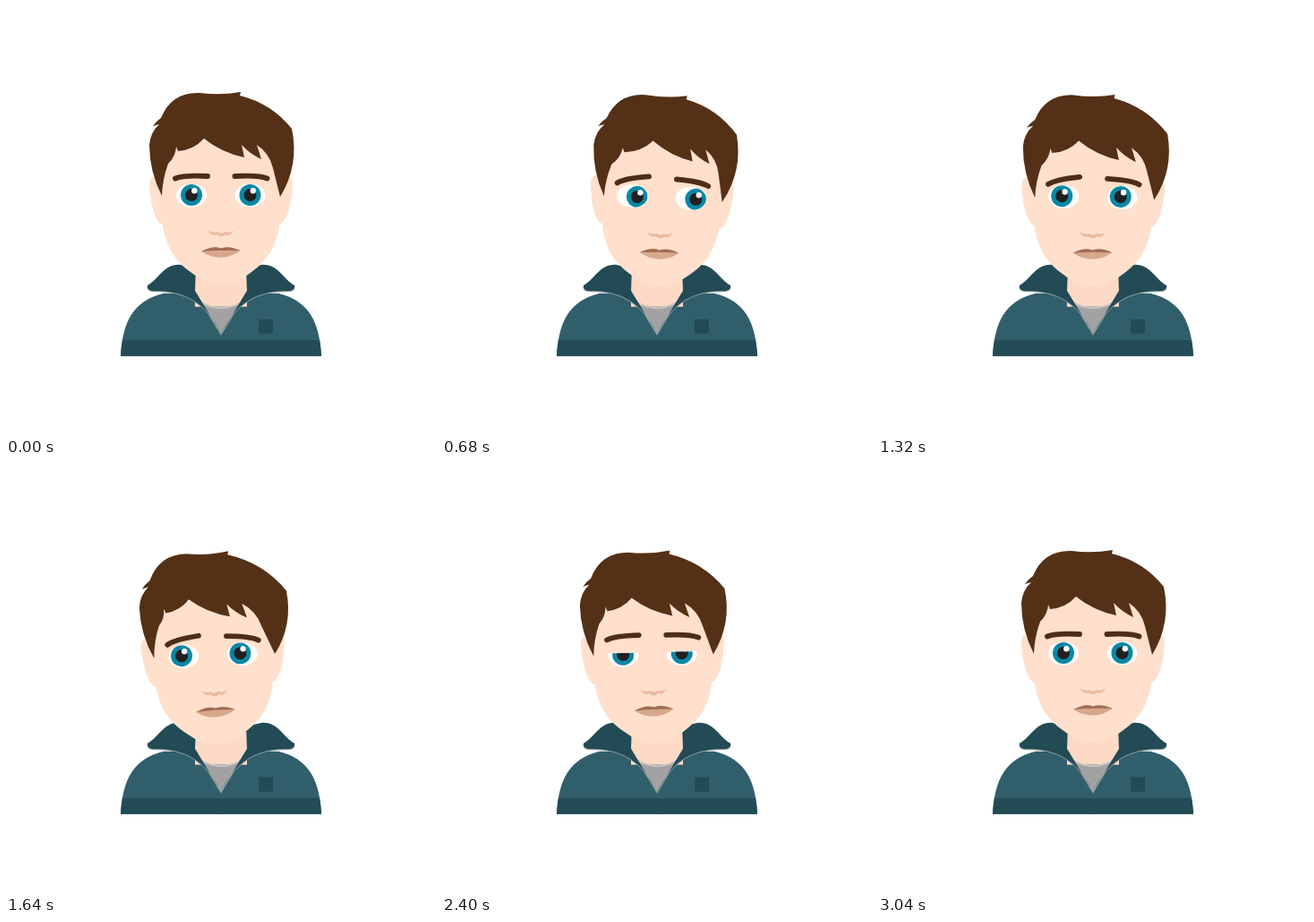
Recreate the animation shown at these times as an HTML page with a canvas. Size 480 px wide and 480 px high, loop 3080 ms.

```html
<!DOCTYPE html>
<html lang="en">
<head>
<meta charset="utf-8">
<title>Avatar looking around</title>
<style>
html, body { margin: 0; width: 100%; height: 100%; overflow: hidden; background: #fff; }
canvas { display: block; width: 100vw; height: 100vh; }
</style>
</head>
<body>
<canvas id="stage" width="480" height="480"></canvas>
<script>
const ctx = document.getElementById('stage').getContext('2d');
const LOOP = 3080, STEP = 40;
const SKIN = '#fee0cd', NECK = '#fcdac6', HAIR = '#543016', BROW = '#4d2d15';
const TEAL = '#305f6b', DARK = '#234b55', GREY = '#a3a2a2';

// left halves, mirrored at x = 240
const half = {
  body: new Path2D('M128 390C130 352 142 328 176 320H241V390Z'),
  collar: new Path2D('M212 292L194 288C176 287 171 304 158 311Q156 317 165 318Q217 316 240 365L211 317Z'),
  zip: new Path2D('M159 316Q161 318 166 318Q217 316 240 365'),
  ear: new Path2D('M172 189Q160 188 160 199Q162 232 172 243L180 245Z'),
  face: new Path2D('M170 150L174 238C177 268 188 284 206 297Q223 311 241 311V150Z')
};
const shirt = new Path2D('M217 329Q240 343 263 329L240 367Z');
const neckline = new Path2D('M217 330Q240 343 263 330');
const nose = new Path2D('M225 250.5Q230 258 235 255Q240 260 245 255Q250 258 254 250.5Q248 254 244 252Q240 255 236 252Q232 254 225 250.5Z');
const lip = new Path2D('M218 274Q240 270 262 273Q240 288 218 274Z');
const mouth = new Path2D('M218 274Q231 267 240 270.5Q249 267 262 273Q240 272 218 274Z');
const brow = new Path2D('M-18 2Q-9 -2 18 -0.5');

function ease(t, from, to) {
  const p = Math.min(1, Math.max(0, (t - from) / (to - from)));
  return (1 - Math.cos(Math.PI * p)) / 2;
}

function fill(path, color) {
  ctx.fillStyle = color;
  ctx.fill(path);
}

function stroke(path, color, width) {
  ctx.strokeStyle = color;
  ctx.lineWidth = width;
  ctx.stroke(path);
}

function dot(x, y, r, color) {
  ctx.fillStyle = color;
  ctx.beginPath();
  ctx.arc(x, y, r, 0, 7);
  ctx.fill();
}

function mirrored(draw) {
  draw();
  ctx.save();
  ctx.translate(480, 0);
  ctx.scale(-1, 1);
  draw();
  ctx.restore();
}

function drawJacket() {
  ctx.save();
  ctx.translate(0, 0.7);
  mirrored(() => {
    fill(half.body, TEAL);
    ctx.save();
    ctx.clip(half.body);
    ctx.fillStyle = DARK;
    ctx.fillRect(120, 372.3, 121, 20);
    ctx.restore();
  });
  ctx.fillStyle = NECK;
  ctx.fillRect(211, 275, 58, 60);
  fill(shirt, GREY);
  stroke(neckline, '#c9c6c5', 2);
  mirrored(() => {
    fill(half.collar, DARK);
    stroke(half.zip, '#8f9da0', 1);
  });
  ctx.fillStyle = DARK;
  ctx.fillRect(282, 349, 16, 16);
  ctx.restore();
}

function drawEye(x, y, gaze, lid) {
  ctx.save();
  ctx.beginPath();
  ctx.rect(x - 20, y - 15 + 29 * lid, 40, 40);
  ctx.clip();
  ctx.beginPath();
  ctx.ellipse(x, y + 0.5, 17, 13, 0, 0, 7);
  ctx.clip();
  ctx.fillStyle = '#fff';
  ctx.fillRect(x - 20, y - 20, 40, 40);
  ctx.translate(x + gaze, y + gaze * 0.2);
  dot(0, 0, 12, '#0b87a5');
  dot(0, 0, 7, '#211f20');
  dot(3.3, -4.8, 3.2, '#fff');
  ctx.restore();
}

function drawBrow(x, side, tilt, lift) {
  ctx.save();
  ctx.translate(x, 190.5 + lift);
  ctx.scale(side, 1);
  ctx.rotate(-tilt);
  stroke(brow, BROW, 5.8);
  ctx.restore();
}

// pen that draws arcs; bend is the bulge to the outside per chord length
function makePen(x, y) {
  ctx.beginPath();
  ctx.moveTo(x, y);
  return (nx, ny, bend = 0) => {
    const dx = nx - x, dy = ny - y;
    ctx.quadraticCurveTo((x + nx) / 2 + bend * dy, (y + ny) / 2 - bend * dx, nx, ny);
    x = nx;
    y = ny;
  };
}

function drawHair(right, left) {
  const bulge = 6 * left;
  const front = 5 * right - 6 * left;
  const arc = makePen(174, 212);
  // crown
  arc(160, 155, 0.12);
  arc(171, 132, 0.2);
  arc(164, 134);
  arc(173, 125, 0.1);
  arc(216, 97, 0.35);
  arc(262, 96, -0.08);
  arc(261, 100);
  arc(319 + bulge, 137 + bulge, 0.17);
  arc(306 + bulge / 2, 213, 0.2);
  arc(298 + front / 2, 181);
  // fringe
  for (let i = 1; i >= 0; i--) {
    arc(263 + 17 * i + front, 155, 0.1 - 0.3 * i);
    arc(266 + 19 * i + front, 169 + 2 * i);
  }
  arc(221 + front, 148, 0.12);
  arc(192 + front / 2, 162, 0.2);
  arc(190 + front / 2, 157);
  arc(181, 176, 0.2);
  arc(174, 212, -0.08);
  ctx.fillStyle = HAIR;
  ctx.fill();
}

function drawHead(t) {
  const turn = ease(t, 1040, 1740);
  const right = ease(t, 40, 540) * (1 - turn);
  const left = turn * (1 - ease(t, 2060, 2740));
  const gaze = 5.5 * ease(t, 40, 380) - 7.7 * ease(t, 1000, 1360) + 2.2 * ease(t, 2000, 2400);
  const worry = ease(t, 40, 540) - ease(t, 2060, 2620);
  const lid = ease(t, 2310, 2500) - ease(t, 2500, 2680);

  ctx.save();
  ctx.translate(240 + 1.5 * right - 5.2 * left, 300 + 2 * right + 2 * left);
  ctx.rotate((2.5 * right - 2.8 * left) * Math.PI / 180);
  ctx.translate(-240, -300);
  mirrored(() => {
    fill(half.ear, SKIN);
    fill(half.face, SKIN);
  });
  drawEye(207, 211, gaze, lid);
  drawEye(272.5, 211, gaze, lid);
  fill(nose, '#ebbaa2');
  fill(lip, '#d7a88d');
  fill(mouth, '#a06d54');
  ctx.save();
  ctx.translate(1.5 * right, right);
  drawHair(right, left);
  ctx.restore();
  drawBrow(207, 1, 0.17 * worry, 2 * worry);
  drawBrow(273.5, -1, 0.1 * worry, 2.5 * worry);
  ctx.restore();
}

function frame(now) {
  const t = Math.floor((now % LOOP) / STEP) * STEP;
  ctx.fillStyle = '#fff';
  ctx.fillRect(0, 0, 480, 480);
  ctx.lineCap = 'round';
  drawJacket();
  drawHead(t);
  requestAnimationFrame(time => frame(Math.max(0, time - start)));
}

const start = performance.now();
frame(0);
</script>
</body>
</html>
```
